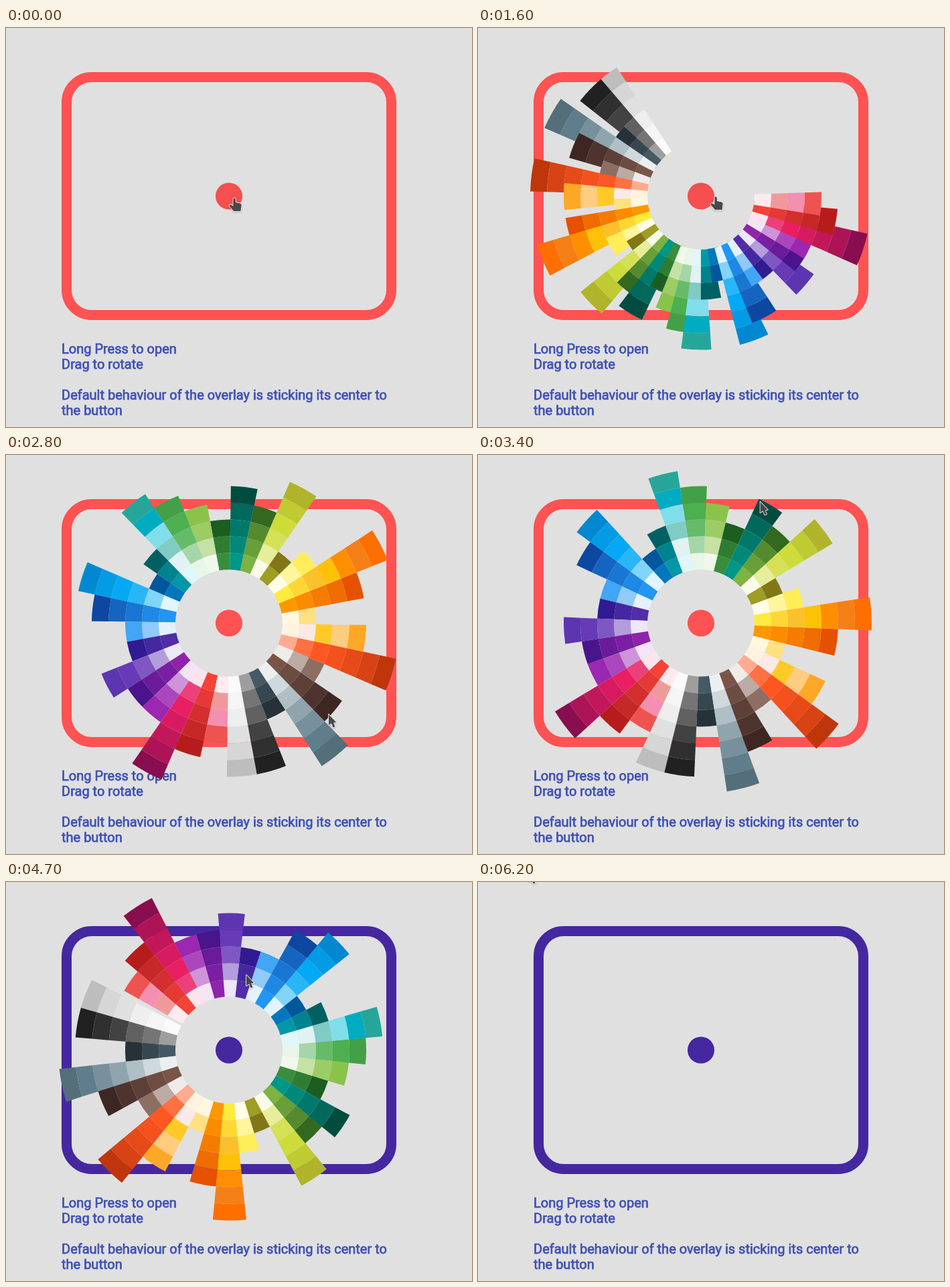
These frames come from a looping animation (696x597 px, 6400 ms). An HTML page:

```html
<!DOCTYPE html>
<html lang="en">
<head>
<meta charset="utf-8">
<title>Radial color picker</title>
<style>
  html, body { margin: 0; width: 100%; height: 100%; overflow: hidden; background: #e0e0e0; }
  svg { display: block; width: 696px; height: 597px; }
  text {
    font: 400 20px Roboto, sans-serif;
    fill: #3f51b5; stroke: #3f51b5; stroke-width: .75px;
  }
  .pointer {
    fill: #484848; stroke: #fff; stroke-width: 1.6px; stroke-linejoin: round; paint-order: stroke;
    filter: drop-shadow(0 1px 1px rgba(0, 0, 0, .25));
  }
</style>
</head>
<body>
<svg viewBox="0 0 696 597">
  <defs><clipPath id="disc"><circle cx="333" cy="251.5" r="20"/></clipPath></defs>
  <rect id="frame" x="90.5" y="73.5" width="485" height="356" rx="37.5" fill="none" stroke-width="15"/>
  <circle id="button" cx="333" cy="251.5" r="20"/>
  <g clip-path="url(#disc)">
    <circle id="hover" cx="333" cy="251.5" r="20" fill="#000" opacity=".04"/>
    <circle id="glow" cx="333" cy="251.5" r="20" fill="#bcbcbc"/>
    <circle id="splash" cx="340" cy="255" fill="#c8c8c8"/>
  </g>
  <text x="83" y="487">Long Press to open</text>
  <text x="83" y="510">Drag to rotate</text>
  <text x="83" y="556">Default behaviour of the overlay is sticking its center to</text>
  <text x="83" y="579">the button</text>
  <g id="wheel" transform="translate(333 251.5)"></g>
  <path id="hand" class="pointer" d="M-1.6 1.4Q0-.8 1.7 1.4L2 7 9 8.6Q11 9.2 10.7 11.5L9.5 20H-1L-7.5 12.5Q-8 10-5.5 10L-1.7 12.5Z"/>
  <path id="arrow" class="pointer" d="M0 0V16.5L4 13.6 6.6 19.8 9.6 18.5 7.2 12.6 11.4 12Z"/>
</svg>
<script>
const LOOP = 6400, STEP = 100, INNER = 80, RING = 25, CX = 333, CY = 251.5;
const RAD = Math.PI / 180;

// One swatch ray per line, from the hub outwards.
const rays = `
ffebee ef9a9a f48fb1 ef5350
f44336 e53935 d32f2f c62828 b71c1c
fce4ec ec407a e91e63 d81b60 c2185b ad1457 880e4f
f3e5f5 ce93d8 ab47bc 9c27b0
8e24aa 7b1fa2 6a1b9a 4a148c
ede7f6 b39ddb 7e57c2 673ab7 5e35b1
512da8 4527a0 311b92
e3f2fd 90caf9 42a5f5
2196f3 1e88e5 1976d2 1565c0 0d47a1
e1f5fe 81d4fa 29b6f6 03a9f4 039be5 0288d1
0277bd 01579b
0097a7 00838f 006064
e0f7fa e0f2f1 80cbc4 80deea 00acc1 26a69a
e8f5e9 a5d6a7 66bb6a 4caf50 43a047
f1f8e9 c5e1a5 9ccc65 8bc34a
388e3c 2e7d32 1b5e20
009688 00897b 00796b 00695c 004d40
7cb342 689f38 558b2f 33691e
f9fbe7 e6ee9c d4e157 cddc39 c0ca33 afb42b
9e9d24 827717
fffde7 fff59d ffee58
ffeb3b fdd835 fbc02d ffc107 ff8f00 f57f17 ff6f00
ff9800 fb8c00 f57c00 ef6c00 e65100
fff8e1 ffe082
fff3e0 fbe9e7 ffca28 ffcc80 ffa726
ffab91 ff7043 ff5722 f4511e e64a19 d84315 bf360c
efebe9 bcaaa4 8d6e63
795548 6d4c41 5d4037 4e342e 3e2723
eceff1 cfd8dc b0bec5 90a4ae 78909c 607d8b 546e7a
455a64 37474f 263238
9e9e9e 757575 616161 424242 303030 212121
fafafa f5f5f5 eeeeee e0e0e0 d6d6d6 bdbdbd`.trim().split('\n').map(row => row.split(' '));

const SLICE = 360 / rays.length;
const $ = id => document.getElementById(id);
const clamp = v => Math.min(1, Math.max(0, v));
const set = (el, attrs) => { for (const k in attrs) el.setAttribute(k, attrs[k]); };

function make(tag, parent, attrs = {}) {
  const el = document.createElementNS('http://www.w3.org/2000/svg', tag);
  set(el, attrs);
  parent.appendChild(el);
  return el;
}

function cellPath(ring) {
  const a = INNER + ring * RING, b = a + RING;
  const c = Math.cos(SLICE / 2 * RAD), s = Math.sin(SLICE / 2 * RAD);
  return `M${a * c} ${-a * s}L${b * c} ${-b * s}A${b} ${b} 0 0 1 ${b * c} ${b * s}` +
         `L${a * c} ${a * s}A${a} ${a} 0 0 0 ${a * c} ${-a * s}Z`;
}

// The first ray lies on top, so build from the last one.
const groups = [];
for (let i = rays.length - 1; i >= 0; i--) {
  groups[i] = make('g', $('wheel'));
  rays[i].forEach((color, ring) => make('path', groups[i], { d: cellPath(ring), fill: '#' + color }));
}

// Cubic bezier (.4, 0, .2, 1)
function ease(x) {
  if (x <= 0 || x >= 1) return clamp(x);
  let lo = 0, hi = 1, s;
  for (let i = 0; i < 30; i++) {
    s = (lo + hi) / 2;
    const bx = 1.2 * (1 - s) ** 2 * s + .6 * (1 - s) * s * s + s ** 3;
    if (bx < x) lo = s; else hi = s;
  }
  return 3 * s * s - 2 * s ** 3;
}

// Linear track through [time, ...values] keys
function track(keys, t) {
  const n = keys.findIndex(k => k[0] > t);
  if (n < 0) return keys[keys.length - 1].slice(1);
  if (n === 0) return keys[0].slice(1);
  const a = keys[n - 1], b = keys[n], f = (t - a[0]) / (b[0] - a[0]);
  return a.slice(1).map((v, i) => v + (b[i + 1] - v) * f);
}

const turnKeys = [[2400, 0], [2500, 6], [2600, 29.4], [2700, 68], [2800, 90.8], [3300, 90.8],
  [3400, 115], [3500, 147], [3600, 181], [3700, 203], [3800, 208.7], [3900, 209.6]];
const pointerKeys = [[0, 341, 254], [100, 340, 254.5], [1300, 340, 254.5], [1600, 355, 252],
  [2000, 430, 150], [2400, 467, 101], [2800, 482, 388], [3200, 345, 55], [3300, 340, 50],
  [3800, 508.5, 351.5], [4000, 500, 330], [4500, 359, 139], [4700, 359, 139], [5200, 386, 220],
  [5500, 386, 220], [5800, 200, 95], [6000, 72, 15], [6100, 75, -4], [6200, 76, -17]];

function orbit(deg) {
  return [CX + 202 * Math.cos(deg * RAD), CY + 202 * Math.sin(deg * RAD)];
}

function pointerAt(t, turn) {
  if (t >= 2400 && t <= 2800) return orbit(turn - 48.3);
  if (t >= 3300 && t <= 3800) return orbit(turn - 179);
  return track(pointerKeys, t);
}

function draw(t) {
  const [turn] = track(turnKeys, t);
  const spread = t < 4000 ? ease((t - 1390) / 500) : ease(1 - (t - 4634) / 600);
  const alpha = t < 4000 ? clamp((t - 1100) / 200) : clamp((5500 - t) / 200);

  $('wheel').style.display = alpha ? '' : 'none';
  groups.forEach((g, i) => set(g, {
    transform: `rotate(${turn + spread * (i + .5) * SLICE})`,
    opacity: alpha
  }));

  const color = t < 4650 ? '#ff5252' : '#4527a0';
  set($('frame'), { stroke: color });
  set($('button'), { fill: color });

  const release = clamp((1300 - t) / 200);
  set($('hover'), { opacity: t < 1700 ? .04 : 0 });
  set($('glow'), { opacity: .4 * clamp((t - 550) / 200) * release });
  set($('splash'), { r: 30 * clamp((t - 550) / 800), opacity: .4 * release });

  const hand = t < 1700, [x, y] = pointerAt(t, turn);
  $('hand').style.display = hand ? '' : 'none';
  $('arrow').style.display = hand ? 'none' : '';
  set($(hand ? 'hand' : 'arrow'), { transform: `translate(${x} ${y})` });
}

const start = performance.now();
function tick() {
  const t = (performance.now() - start) % LOOP;
  draw(Math.min(Math.floor(t / STEP) * STEP, 6200));
  requestAnimationFrame(tick);
}
tick();
</script>
</body>
</html>
```
